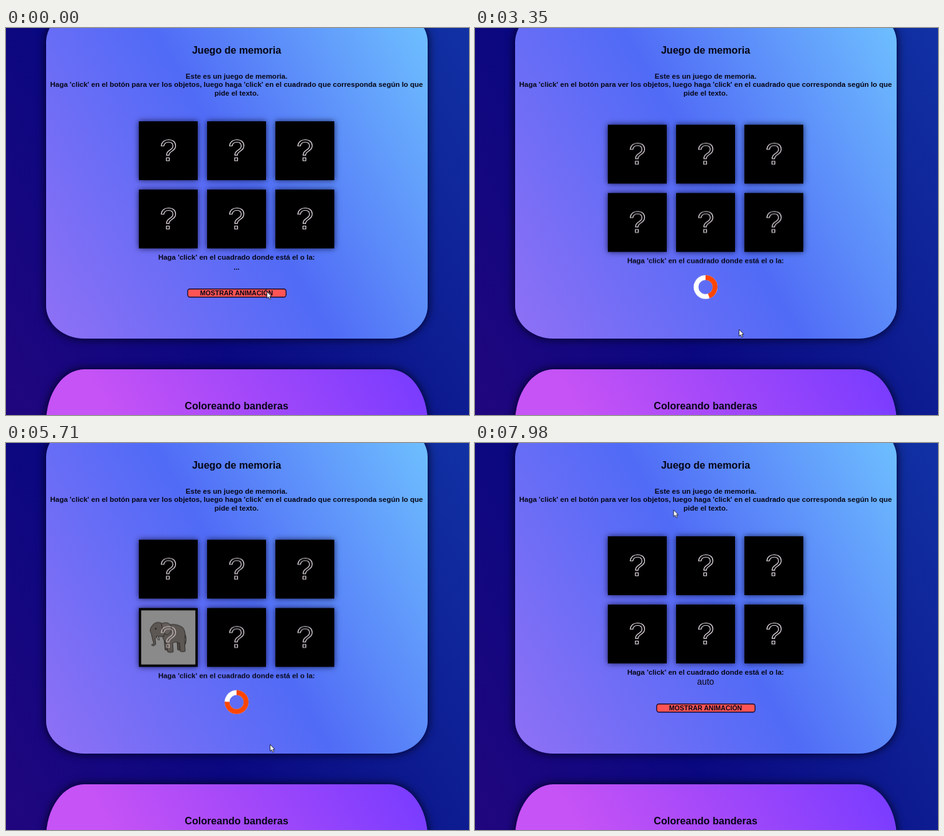
Animation, 739 px wide and 618 px high, one loop 8 s. Source, as an HTML page:

```html
<!DOCTYPE html>
<html lang="es">
<head>
<meta charset="utf-8">
<title>Juego de memoria</title>
<style>
  html, body { margin: 0; width: 100%; height: 100%; overflow: hidden; }
  body { background: #0b0880; }
  .stage {
    position: relative; width: 739px; height: 618px; overflow: hidden;
    background: linear-gradient(60deg, #21067e, #0a0880 37%, #1132a4);
    font-family: "Liberation Sans", Arial, sans-serif;
  }
  .panel { position: absolute; left: 64px; width: 609px; border-radius: 10%; box-shadow: 0 0 13px 2px rgba(0, 0, 20, .75); }
  .memory { top: -30px; height: 526px; background: linear-gradient(60deg, #8f70f5, #506bf6 50%, #6fc2ff); }
  .flags { top: 545px; height: 850px; background: linear-gradient(60deg, #c653f5 50%, #763bff); }

  .layer { position: absolute; left: 0; top: 0; width: 739px; height: 618px; }
  .layer text { text-anchor: middle; font-weight: bold; font-size: 11.5px; fill: #070716; }
  .layer .title { font-size: 16.1px; }
  .layer .answer { font-size: 14px; font-weight: normal; }
  .layer .label { font-size: 10.5px; }

  .grid {
    position: absolute; left: 212px; top: 149px; display: grid;
    grid-template: repeat(2, 93.7px) / repeat(3, 94px); gap: 15.5px 15.2px;
  }
  .tile { background: #000; box-shadow: 0 0 9px rgba(0, 0, 30, .75); }
  .tile svg { display: block; width: 94px; height: 94px; }
  .mark { font-size: 48px; text-anchor: middle; fill: #000; stroke: #efe6ee; stroke-width: 1.2; }

  /* One shared 8 s clock */
  .shift { animation: shift 8s step-end infinite; }
  .idle { animation: idle 8s step-end infinite; }
  .before { animation: before 8s step-end infinite; }
  .after { animation: after 8s step-end infinite; }
  .busy { animation: busy 8s step-end infinite; }
  .picture { opacity: 0; animation: reveal 8s calc(1308ms + var(--turn) * 1022ms) infinite; }
  .late { animation: late 8s step-end infinite; }
  .arc { stroke-dasharray: 100; animation: fill 8s linear infinite; }
  .pointer { animation: travel 8s linear infinite; }

  @keyframes shift { 0%, 92.875% { transform: none; } 3.5% { transform: translateY(5.5px); } }
  @keyframes idle { 0%, 92.875% { opacity: 1; } 3.5% { opacity: 0; } }
  @keyframes busy { 0%, 92.875% { opacity: 0; } 3.5% { opacity: 1; } }
  @keyframes before { 0% { opacity: 1; } 3.5%, 100% { opacity: 0; } }
  @keyframes after { 0% { opacity: 0; } 92.875%, 100% { opacity: 1; } }
  @keyframes late { 0%, 84.3% { opacity: 0; } 73.9% { opacity: 1; } }
  @keyframes reveal {
    0% { opacity: 0; animation-timing-function: ease; }
    12.5%, 12.72% { opacity: 1; }
    12.725%, 100% { opacity: 0; }
  }
  @keyframes fill {
    0%, 3.5% { stroke-dashoffset: 100; }
    19.75% { stroke-dashoffset: 80.5; }
    29.125% { stroke-dashoffset: 72; }
    41.875% { stroke-dashoffset: 55.5; }
    62.625% { stroke-dashoffset: 32.5; }
    80% { stroke-dashoffset: 16.5; }
    92.875%, 100% { stroke-dashoffset: 0; }
  }
  @keyframes travel {
    0%, 5% { transform: translate(416px, 420.5px); animation-timing-function: ease-in-out; }
    10%, 97.1% { transform: translate(421px, 481px); }
    99.75%, 100% { transform: translate(316.5px, 106.5px); }
  }
</style>
</head>
<body>
<div class="stage">
  <div class="panel memory"></div>
  <div class="panel flags"></div>
  <div class="grid shift" id="grid"></div>

  <svg class="layer" viewBox="0 0 739 618">
    <text class="title" x="368" y="41">Juego de memoria</text>
    <text x="368" y="81">Este es un juego de memoria.</text>
    <text x="368" y="94.4">Haga 'click' en el botón para ver los objetos, luego haga 'click' en el cuadrado que corresponda según lo que</text>
    <text x="368" y="107.7">pide el texto.</text>
    <text class="shift" x="368" y="370">Haga 'click' en el cuadrado donde está el o la:</text>
    <text class="before" x="368" y="386">...</text>
    <text class="answer after" x="368" y="385.5">auto</text>
    <g class="idle">
      <rect x="290" y="416.7" width="157" height="13" rx="3.5" fill="#ff5454" stroke="#150a30" stroke-width="1.4"/>
      <text class="label" x="368" y="427">MOSTRAR ANIMACIÓN</text>
    </g>
    <text class="title" x="368" y="609">Coloreando banderas</text>

    <g class="busy" fill="none" stroke-width="7.8">
      <g transform="translate(368 413.7) rotate(-90)">
        <circle r="15.1" stroke="#fff"/>
        <circle class="arc" r="15.1" pathLength="100" stroke="#ff4500"/>
        <g class="late">
          <circle class="arc" r="15.1" pathLength="100" stroke="#463434"/>
          <circle r="15.1" pathLength="100" stroke="#ff4500" stroke-dasharray="73 100"/>
        </g>
      </g>
    </g>
    <path class="pointer" d="M.5 .5V11L3 8.8 4.8 12.8 6.6 12 4.9 8.1H8Z" fill="#fff" stroke="#181828" stroke-width=".9"/>
  </svg>
</div>

<script>
  const car = `
    <g stroke="#401515" stroke-width=".8">
      <path d="M19 57L20 50Q29 45 38 40Q44 27 56 24Q70 21 75 30Q78 38 76 47L72 52L46 65Q34 69 22 63Z" fill="#d5301d"/>
      <path d="M40 40Q45 31 53 30L58 42Q48 46 40 40M61 41L59 30Q67 26 72 32L73 38Z" fill="#79b9cd"/>
      <path d="M22 51Q34 52 42 46M58 42L59 58M60 46L75 40" fill="none"/>
      <ellipse cx="48" cy="60" rx="4.5" ry="6.5" fill="#222"/>
      <ellipse cx="71" cy="49" rx="3.5" ry="6" fill="#222"/>
      <path d="M18 57Q27 66 41 64" fill="none" stroke="#5c9dbb" stroke-width="2.5"/>
      <circle cx="24" cy="53" r="2" fill="#eee"/><circle cx="38" cy="56" r="2.2" fill="#eee"/>
    </g>`;

  const ball = `
    <circle cx="49" cy="47.5" r="26.5" fill="#fbfbfb" stroke="#444" stroke-width="1.2"/>
    <path d="M31 28L40 26 44 33 37 40 30 37ZM59 37L68 34 72 43 67 51 60 47ZM37 55L45 52 52 57 50 66 41 68 36 63ZM23 48L27 52 28 61 25 60ZM58 67L68 62 70 64Q65 71 59 72ZM48 21Q56 21 63 25L57 27Z" fill="#202020"/>
    <path d="M44 33L55 32 59 37M57 27L55 32M68 34L66 28M37 40L38 48 45 52M60 47L52 57M67 51L68 62M50 66L58 67M30 37L25 43 23 48M27 52L37 55M36 63L28 61M41 68L43 73M40 26L48 21M72 43L75 46" fill="none" stroke="#555" stroke-width="1"/>`;

  const elephant = `
    <g fill="#aca19a" stroke="#4a4442" stroke-width=".9" stroke-linejoin="round">
      <path d="M73 41Q77 48 74 58" fill="none" stroke-width="1.4"/>
      <path d="M40 47L42 67H49L50 56ZM61 52L62 67H68L69 50Z" fill="#8d837e"/>
      <path d="M43 28Q58 23 70 31Q76 38 73 50L74 69Q70 71 66 69L65 56Q58 53 54 56L55 70Q50 72 46 70L44 56Q36 49 37 35Z"/>
      <path d="M20 30Q26 20 36 24L43 33 40 45 31 46Q27 45 26 49L27 58Q24 62 20 59L24 57Q21 48 20 41Q16 36 20 30Z"/>
      <path d="M36 25Q48 20 52 30Q53 40 45 43Q38 40 36 25Z" fill="#b9aea6"/>
      <path d="M28 45Q29 51 33 51L31 45Z" fill="#fff"/>
      <circle cx="27" cy="33" r="1" fill="#222"/>
    </g>`;

  const house = `
    <path d="M26 45H68V70H26Z" fill="#e3c48c"/><path d="M20 47L47 23 74 47Z" fill="#b8452f"/>
    <path d="M42 54H52V70H42Z" fill="#6b4429"/>`;
  const tree = `<path d="M43 50H51V72H43Z" fill="#7a4c2a"/><circle cx="47" cy="39" r="19" fill="#3f9a45"/>`;
  const apple = `
    <path d="M47 34Q62 24 68 42Q70 62 55 70L47 68 39 70Q24 62 26 42Q32 24 47 34Z" fill="#cf2d2d"/>
    <path d="M47 34Q47 26 52 22" fill="none" stroke="#5b3a20" stroke-width="2.5"/>`;

  // Row by row: drawing and its turn in the reveal
  const tiles = [[car, 0], [ball, 3], [house, 1], [elephant, 4], [tree, 2], [apple, 5]];

  document.getElementById("grid").innerHTML = tiles.map(([art, turn]) => `
    <div class="tile"><svg viewBox="0 0 94 94">
      <text class="mark" x="47" y="63">?</text>
      <g class="picture" style="--turn:${turn}">
        <rect x="3.7" y="3.7" width="86.6" height="86.6" fill="#fff"/>${art}
      </g>
    </svg></div>`).join("");
</script>
</body>
</html>
```
